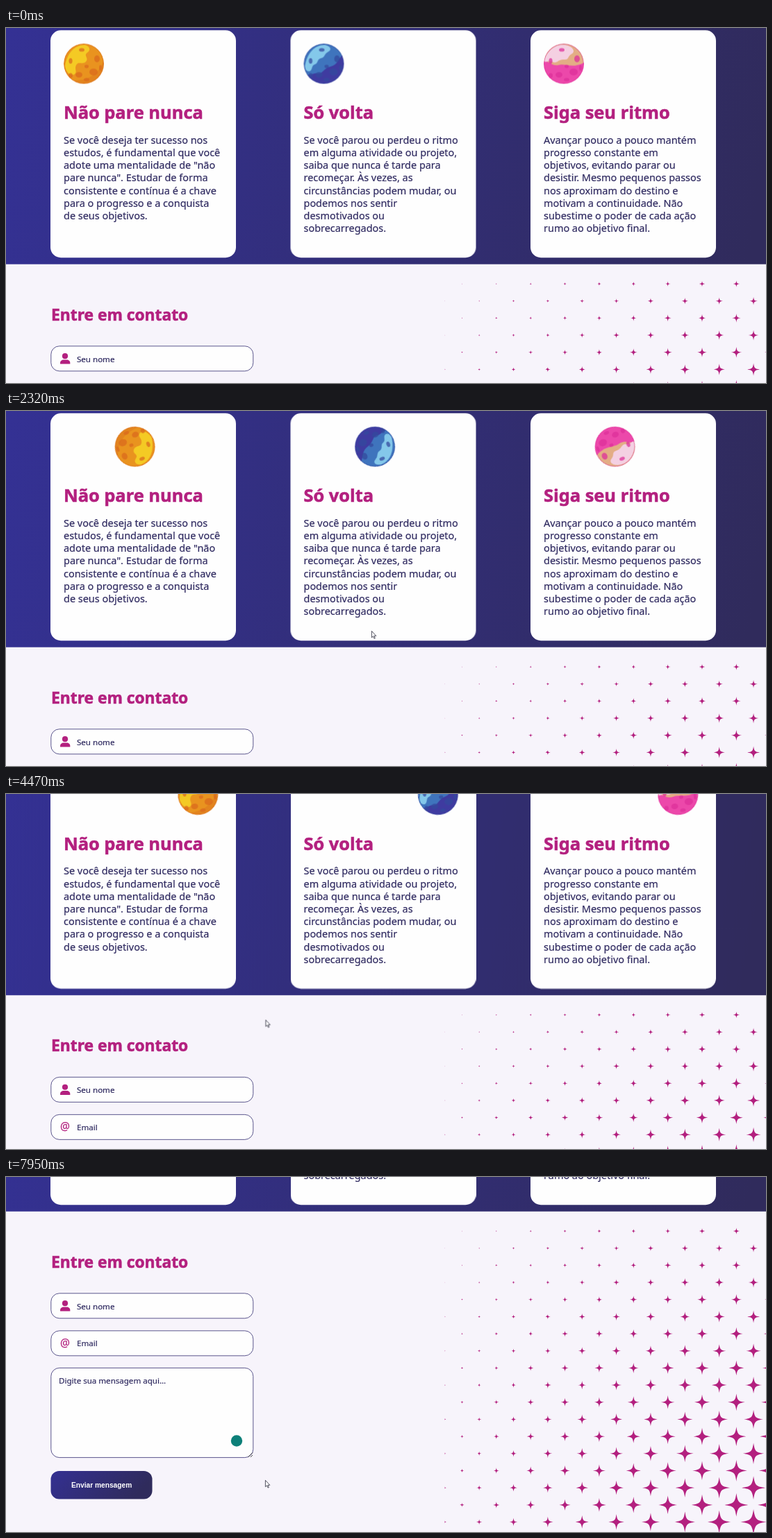
Write an HTML page that moves like this. It is 1094 px wide and 512 px high and loops after 8 s.

```html
<!DOCTYPE html>
<html lang="pt-BR">
<head>
<meta charset="utf-8">
<title>Entre em contato</title>
<style>
html, body { margin: 0; width: 100%; height: 100%; overflow: hidden; background: #f7f4fb; }
svg { display: block; width: 1094px; height: 512px; }
text { font-family: "Noto Sans", sans-serif; fill: #2f2a60; stroke: #2f2a60; stroke-width: .2px; white-space: pre; }
.title { font-weight: 700; font-size: 25.4px; fill: #b3207f; stroke: #b3207f; stroke-width: .6px; }
.contact { font-size: 22.8px; }
.body { font-size: 14.45px; }
.hint { font-size: 11.55px; }
.at { font-size: 15.5px; fill: #b3207f; stroke: #b3207f; }
.send { font: 700 10.2px "Liberation Sans", Arial, sans-serif; fill: #fff; stroke: none; }
.field { fill: #fefefe; stroke: #4a4580; stroke-width: .9; }
.pink { fill: #b3207f; }

#page, #cursor, .slide, .spin, .arrow, .beam { animation: 8s linear infinite; }
#page { animation-name: scroll; }
#cursor { animation-name: move; }
.slide { animation-name: slide; }
.spin { animation-name: spin; }
.arrow { animation-name: arrow; animation-timing-function: step-end; }
.beam { animation-name: beam; animation-timing-function: step-end; }

@keyframes slide {
  0% { transform: translateX(0); animation-timing-function: ease-in-out; }
  62.5%, 100% { transform: translateX(168px); }
}
@keyframes spin {
  0% { transform: rotate(0deg); animation-timing-function: ease-in-out; }
  62.5%, 100% { transform: rotate(360deg); }
}
@keyframes scroll {
  0%, 52.4% { transform: translateY(0); animation-timing-function: ease-in; }
  55.875% { transform: translateY(-50px); animation-timing-function: cubic-bezier(.3, .25, .6, 1); }
  60%, 64% { transform: translateY(-223px); }
  64.875% { transform: translateY(-228px); animation-timing-function: cubic-bezier(.3, .3, .6, 1); }
  68.75%, 100% { transform: translateY(-291px); }
}
@keyframes move {
  0%, 14.1% { transform: translate(1077px, 501px); animation-timing-function: ease-out; }
  18.6%, 32.5% { transform: translate(526px, 317px); animation-timing-function: ease-in-out; }
  39.2%, 42.7% { transform: translate(383px, 324px); animation-timing-function: ease-in-out; }
  47.5%, 68.75% { transform: translate(373.5px, 325.5px); animation-timing-function: ease-in-out; }
  74.25%, 80.8% { transform: translate(290px, 321px); animation-timing-function: ease-in-out; }
  83.75% { transform: translate(539px, 400px); }
  86.25% { transform: translate(430px, 461px); animation-timing-function: ease-out; }
  90.75% { transform: translate(166px, 440px); }
  91.6%, 92.9% { transform: translate(168px, 441px); animation-timing-function: ease-in-out; }
  99.3%, 100% { transform: translate(373px, 437px); }
}
@keyframes arrow {
  0% { visibility: hidden; }
  14.1% { visibility: visible; }
  70.3% { visibility: hidden; }
  81.9%, 100% { visibility: visible; }
}
@keyframes beam {
  0% { visibility: hidden; }
  70.3% { visibility: visible; }
  81.9%, 100% { visibility: hidden; }
}
</style>
</head>
<body>
<svg viewBox="0 0 1094 512">
  <defs>
    <linearGradient id="night" gradientUnits="userSpaceOnUse" x1="0" y1="0" x2="1094" y2="190">
      <stop offset="0" stop-color="#343194"/><stop offset="1" stop-color="#302b5c"/>
    </linearGradient>
    <linearGradient id="btn" x2="1" y2=".25">
      <stop offset="0" stop-color="#343092"/><stop offset="1" stop-color="#2f2b5c"/>
    </linearGradient>
    <clipPath id="disc"><circle r="29"/></clipPath>
    <clipPath id="right"><rect x="631.5" y="341" width="463" height="480"/></clipPath>
  </defs>
  <g id="page">
    <rect y="-10" width="1094" height="352" fill="url(#night)"/>
    <g id="cards"></g>
    <rect y="340.7" width="1094" height="480" fill="#f7f4fb"/>
    <path id="stars" class="pink" clip-path="url(#right)"/>

    <text class="title contact" x="65" y="421.5">Entre em contato</text>
    <rect class="field" x="64.8" y="458.8" width="291" height="36" rx="12"/>
    <circle class="pink" cx="85" cy="473.2" r="4.1"/>
    <path class="pink" d="M78 484.5V483C78 480 80.5 478.5 83 478.5H87.5C90 478.5 92.3 480 92.3 483V484.5Z"/>
    <text class="hint" x="102" y="481.5">Seu nome</text>
    <rect class="field" x="64.8" y="512.8" width="291" height="36" rx="12"/>
    <text class="at" x="78" y="535.5">@</text>
    <text class="hint" x="102" y="535">Email</text>
    <rect class="field" x="64.8" y="566.4" width="291" height="129.2" rx="12"/>
    <text class="hint" x="76" y="589">Digite sua mensagem aqui...</text>
    <path d="M348.5 695L355 688.5M352 695L355 692" stroke="#444" fill="none"/>
    <circle cx="332" cy="671.5" r="8.2" fill="#0d8079"/>
    <rect x="64.5" y="715" width="146" height="40.5" rx="12" fill="url(#btn)"/>
    <text class="send" x="94" y="738.5">Enviar mensagem</text>
  </g>
  <g id="cursor">
    <path class="arrow" d="M.4 .4V9.8L2.5 7.9L4 11.2L5.4 10.6L3.9 7.4H6.8Z" fill="#fff" stroke="#2a2a3a" stroke-width=".8"/>
    <path class="beam" d="M-2 -4.5H2M0 -4.5V4.5M-2 4.5H2" fill="none" stroke="#555"/>
  </g>
</svg>
<script>
const cards = [
  {
    x: 64, title: "Não pare nunca",
    lines: ["Se você deseja ter sucesso nos", "estudos, é fundamental que você", "adote uma mentalidade de \"não",
      "pare nunca\". Estudar de forma", "consistente e contínua é a chave", "para o progresso e a conquista", "de seus objetivos."],
    base: "#e9931f", shade: "#e2841e", light: "#f4ca24", crater: "#d96a1d",
    low: "M29 -8C24 14 8 24 -14 24L-10 32H32Z",
    high: "M-27 3C-24 -16 -12 -28 2 -27C9 -25 10 -19 5 -16C-1 -12 8 -8 3 -3C-2 2 -8 -4 -11 2C-14 8 -9 11 -13 15C-19 19 -26 12 -27 3Z"
  },
  {
    x: 409.5, title: "Só volta",
    lines: ["Se você parou ou perdeu o ritmo", "em alguma atividade ou projeto,", "saiba que nunca é tarde para", "recomeçar. Às vezes, as",
      "circunstâncias podem mudar, ou", "podemos nos sentir", "desmotivados ou", "sobrecarregados."],
    base: "#3f74bd", shade: "#3f3ba0", light: "#84c8ea", crater: "#344a9e",
    low: "M30 -16C22 -10 20 2 10 4C0 6 -2 16 -10 14C-16 13 -18 18 -24 16L-20 32H32Z",
    high: "M-27 3C-24 -16 -12 -28 2 -27C10 -25 12 -20 6 -17C0 -14 2 -9 -4 -8C-10 -7 -8 0 -13 1C-18 2 -16 10 -21 11C-25 11 -27 8 -27 3Z"
  },
  {
    x: 755, title: "Siga seu ritmo",
    lines: ["Avançar pouco a pouco mantém", "progresso constante em", "objetivos, evitando parar ou", "desistir. Mesmo pequenos passos",
      "nos aproximam do destino e", "motivam a continuidade. Não", "subestime o poder de cada ação", "rumo ao objetivo final."],
    base: "#e3ad85", shade: "#ec48aa", light: "#f4d0e2", crater: "#de3099",
    low: "M-30 -3C-22 -6 -18 4 -8 2C2 -1 12 8 30 -2V30H-30Z",
    high: "M-28 -4C-25 -18 -12 -29 2 -27C14 -25 17 -17 11 -14C5 -11 8 -5 0 -6C-8 -7 -10 1 -17 -3C-22 -6 -26 0 -28 -4Z"
  }
];

// Crater centres and radii, relative to the planet's middle
const craters = [[14, 12, 6, 5], [-7, 16, 5, 4], [19, -7, 4, 5], [4, 23, 4, 2.5], [-19, -4, 2.6, 4], [-3, -20, 4, 2.6], [4, 4, 3, 2.4], [-19, 17, 3, 3.5], [24, 6, 2, 4]];

const planet = c => `
  <g clip-path="url(#disc)">
    <circle r="29" fill="${c.base}"/>
    <path d="${c.low}" fill="${c.shade}"/>
    <path d="${c.high}" fill="${c.light}"/>
    ${craters.map(([x, y, rx, ry]) => `<ellipse cx="${x}" cy="${y}" rx="${rx}" ry="${ry}" fill="${c.crater}" opacity=".75"/>`).join("")}
    <circle r="28.4" fill="none" stroke="${c.crater}" stroke-width="1.2" opacity=".5"/>
  </g>`;

const card = c => `
  <g transform="translate(${c.x})">
    <rect y="3.3" width="267" height="327.9" rx="15" fill="#fefefe"/>
    <g transform="translate(48 51.5)"><g class="slide"><g class="spin">${planet(c)}</g></g></g>
    <text class="title" x="19" y="131">${c.title}</text>
    ${c.lines.map((s, i) => `<text class="body" x="19" y="${166.8 + i * 18.22}">${s}</text>`).join("")}
  </g>`;

document.getElementById("cards").innerHTML = cards.map(card).join("");

function star(x, y, r) {
  const a = .12 * r, b = .2 * r;
  return `M${x} ${y - r}c${a} ${r - b} ${b} ${r - a} ${r} ${r}` +
    `c${b - r} ${a} ${a - r} ${b} ${-r} ${r}` +
    `c${-a} ${b - r} ${-b} ${a - r} ${-r} ${-r}` +
    `c${r - b} ${-a} ${r - a} ${-b} ${r} ${-r}z`;
}

// Staggered grid, growing to the right and downwards
let d = "";
for (let row = 0; row < 18; row++) {
  for (let col = row % 2 ? 0 : 1; col < 20; col += 2) {
    const r = (.12 + .88 * col / 18) * (5 + .8 * row);
    d += star(631.8 + col * 24.68, 369 + row * 24.68, r);
  }
}
document.getElementById("stars").setAttribute("d", d);
</script>
</body>
</html>
```
